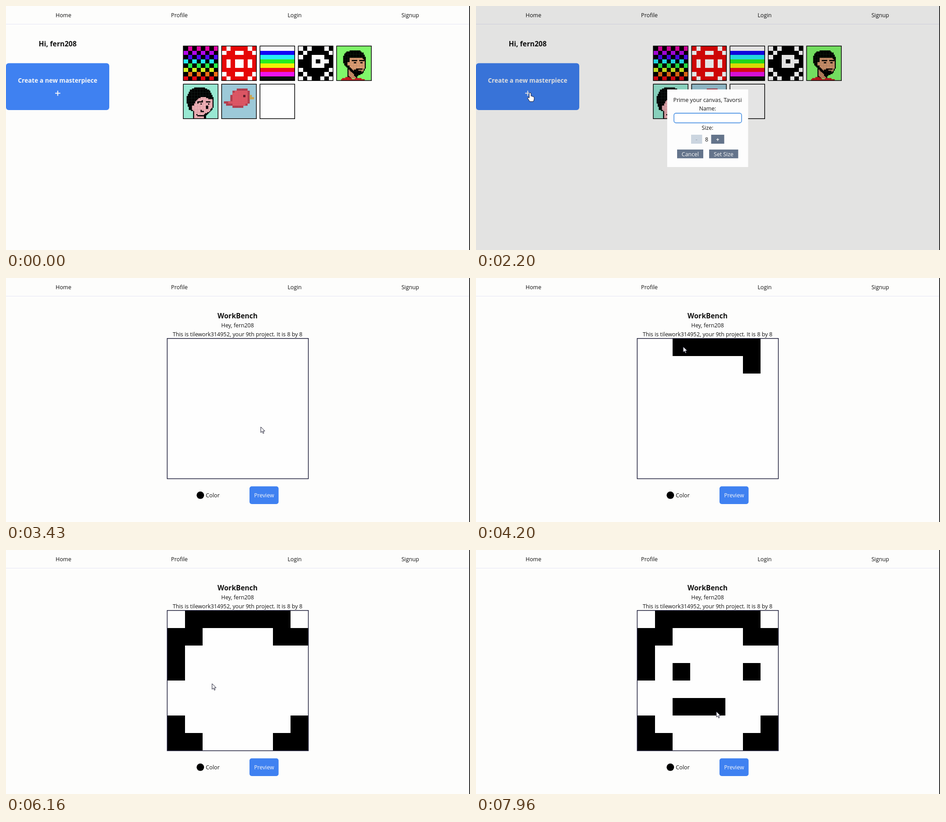
Write an HTML page with a canvas that moves like this. It is 1029x544 px and loops after 8 s.

```html
<!DOCTYPE html>
<html lang="en">
<head>
<meta charset="utf-8">
<title>Pixel workbench</title>
<style>
  html, body { margin: 0; width: 100%; height: 100%; overflow: hidden; background: #fdfdfc; }
  canvas, svg { position: absolute; left: 0; top: 0; display: block; }
  text { font: 12.3px "Open Sans", "Noto Sans", sans-serif; fill: #111; text-anchor: middle; }
  .title { font-size: 15.5px; font-weight: 700; }
  .cta { font-size: 13.6px; font-weight: 700; }
  .light { fill: #f8f8f8; }
  .left { text-anchor: start; }
  .blue { fill: #3f81f1; }
  .slate { fill: #64748b; }
  .cursor path { fill: #fff; stroke: #15152a; stroke-width: 1; stroke-linejoin: round; }
</style>
</head>
<body>
<canvas id="gallery" width="1029" height="270"></canvas>
<svg width="1029" height="544">
  <path d="M0 40.5H1027" stroke="#e4e4f4"/>
  <text x="127.5" y="24.5">Home</text>
  <text x="384.5" y="24.5">Profile</text>
  <text x="640" y="24.5">Login</text>
  <text x="896.5" y="24.5">Signup</text>

  <g id="profile">
    <text class="title" x="114.5" y="90">Hi, fern208</text>
    <rect class="blue" y="127.5" width="229" height="104.5" rx="6"/>
    <text class="cta light" x="114.5" y="171">Create a new masterpiece</text>
    <path d="M109 194.5H120.5M114.7 188.7V200.3" stroke="#f8f8f8" stroke-width="2"/>
  </g>

  <g id="modal">
    <rect width="1027" height="544" opacity=".1"/>
    <rect x="424" y="186" width="179.5" height="173" fill="#fdfdfd"/>
    <text x="513.5" y="214">Prime your canvas, Tavorsi</text>
    <text x="513.5" y="233">Name:</text>
    <rect x="439" y="239" width="150" height="21.5" rx="4.5" fill="#fff" stroke="#5c9ce6" stroke-width="1.8"/>
    <text x="513.5" y="276">Size:</text>
    <rect x="477" y="287" width="24.5" height="20" fill="#cbd5e0"/>
    <text x="489" y="301.5" style="fill:#8b96a6">-</text>
    <text x="511.5" y="302">8</text>
    <rect class="slate" x="521.5" y="287" width="29" height="20"/>
    <text class="light" x="536" y="302" style="font-weight:700">+</text>
    <rect class="slate" x="446" y="320" width="58" height="19.5"/>
    <text class="light" x="475" y="334.5">Cancel</text>
    <rect class="slate" x="517" y="320" width="64.5" height="19.5"/>
    <text class="light" x="549" y="334.5">Set Size</text>
  </g>

  <g id="bench">
    <text class="title" x="513.5" y="90">WorkBench</text>
    <text x="513.5" y="109.5">Hey, fern208</text>
    <text x="513.5" y="129.5">This is tilework314952, your 9th project. It is 8 by 8</text>
    <rect x="357.5" y="134.5" width="313" height="313" fill="#fefefe"/>
    <g id="cells"></g>
    <rect x="357.5" y="134.8" width="313" height="312.7" fill="none" stroke="#1c1c38" stroke-width="1.5"/>
    <circle cx="431" cy="484.3" r="8.3"/>
    <text class="left" x="443" y="489.3">Color</text>
    <rect class="blue" x="540" y="464.5" width="64.5" height="39.5" rx="5"/>
    <text class="light" x="572.3" y="489.3">Preview</text>
  </g>

  <rect x="1027.4" width="1.6" height="544"/>
  <g id="pointer" class="cursor">
    <g id="hand"><path d="M-2 1.5Q0-.9 2 1.5V7.5L7 9Q9 9.6 9 11.5V14Q9 17 7 20H-1Q-3 16-5.4 13Q-6 11-4 10.8L-2 12Z"/></g>
    <g id="arrow"><path d="M0 0V12.5L3 9.8 5 14.6 7 13.7 5 9.2H9Z"/></g>
  </g>
</svg>

<script>
const LOOP = 8000, STEP = 10;
const OPEN = 2040, START = 3430;
const $ = id => document.getElementById(id);
const svg = tag => document.createElementNS('http://www.w3.org/2000/svg', tag);
let rules = '', count = 0;

function animate(el, frames, timing) {
  const name = 'k' + count++;
  const body = frames.map(([ms, css]) => `${ms / LOOP * 100}%{${css}}`).join('');
  rules += `@keyframes ${name}{${body}}`;
  el.style.animation = `${name} ${LOOP}ms ${timing} infinite`;
}

// Visible only inside the given [from, to) spans.
function show(el, ...spans) {
  const frames = spans[0][0] > 0 ? [[0, 'opacity:0']] : [];
  for (const [from, to] of spans) {
    frames.push([from, 'opacity:1'], [to, `opacity:${to < LOOP ? 0 : 1}`]);
  }
  animate(el, frames, 'step-end');
}

show($('gallery'), [0, START]);
show($('profile'), [0, START]);
show($('modal'), [OPEN, START]);
show($('bench'), [START, LOOP]);
show($('hand'), [60, 2450], [3120, START]);
show($('arrow'), [2450, 3120], [START, LOOP]);

// Pointer route: travel eases between stops, draw moves evenly and paints.
const frames = [], painted = new Set();
let now = 0, spot = '120 193';

function paint(x, y, ms) {
  const col = Math.floor((x - 358) / 39), row = Math.floor((y - 135) / 39);
  const key = row * 8 + col;
  if (painted.has(key)) return;
  painted.add(key);
  const cell = svg('rect');
  const box = { x: 358 + col * 39, y: 135 + row * 39, width: 39, height: 39 };
  for (const name in box) cell.setAttribute(name, box[name]);
  $('cells').append(cell);
  show(cell, [ms, LOOP]);
}

function leg(until, route, pen) {
  const path = svg('path');
  path.setAttribute('d', `M${spot}${route}`);
  const length = path.getTotalLength(), from = now;
  for (; now < until; now += STEP) {
    const k = (now - from) / (until - from);
    const p = path.getPointAtLength(length * (pen ? k : k * k * (3 - 2 * k)));
    frames.push([now, `transform:translate(${p.x.toFixed(1)}px,${p.y.toFixed(1)}px)`]);
    if (pen) paint(p.x, p.y, now);
  }
  const end = path.getPointAtLength(length);
  spot = `${end.x} ${end.y}`;
}
const travel = (until, route) => leg(until, route);
const draw = (until, route) => leg(until, route, true);
const rest = until => leg(until, 'h0');

rest(2430);
travel(3230, 'Q420 320 565 332');
rest(START);
travel(3790, 'Q640 230 612 190');
draw(4200, 'L606 154 460 153');
draw(4520, 'L408 155 406 190 376 198 372 275');
travel(4620, 'Q330 330 372 385');
draw(4750, 'L376 425 412 428');
travel(4870, 'Q480 510 600 445');
draw(4970, 'L640 428 650 385');
travel(5000, 'L687 357');
travel(5440, 'Q720 230 655 190');
draw(5470, 'h-4');
travel(6160, 'Q450 225 457 298');
travel(6290, 'L453 275');
draw(6320, 'h4');
travel(6720, 'Q530 250 606 272');
draw(6750, 'h4');
travel(7500, 'Q620 330 452 348');
draw(7960, 'Q460 358 533 360');
rest(LOOP);
frames.push([LOOP, frames.at(-1)[1]]);
animate($('pointer'), frames, 'linear');
document.head.appendChild(document.createElement('style')).textContent = rules;

const ctx = $('gallery').getContext('2d');

function thumb(i, fill) {
  ctx.save();
  ctx.translate(392.5 + i % 5 * 85, 88.5 + Math.floor(i / 5) * 85);
  ctx.fillStyle = '#fefefe';
  ctx.fillRect(0, 0, 78, 78);
  fill();
  ctx.strokeStyle = '#000';
  ctx.lineWidth = 1.5;
  ctx.strokeRect(.75, .75, 77, 77);
  ctx.restore();
}

function grid(color) {
  for (let r = 0; r < 8; r++) for (let c = 0; c < 8; c++) {
    ctx.fillStyle = color(r, c);
    ctx.fillRect(1.5 + Math.round(c * 9.5), 1.5 + Math.round(r * 9.5), 10, 10);
  }
}

const bitmap = (rows, ink) => () => grid((r, c) => rows[r][c] === '#' ? ink : '#fdfdfd');

// Unfolds one quarter into a picture with two mirror axes.
const mirror = list => [...list, ...[...list].reverse()];
const unfold = quarter => mirror(quarter.map(row => mirror([...row])));

// Turns outlines into an n by n pixel picture.
function pixelArt(n, back, shapes) {
  return () => {
    const s = 76 / n;
    ctx.fillStyle = back;
    ctx.fillRect(1, 1, 76, 76);
    const probe = document.createElement('canvas').getContext('2d');
    for (const [color, d] of shapes) {
      const outline = new Path2D(d);
      ctx.fillStyle = color;
      for (let r = 0; r < n; r++) for (let c = 0; c < n; c++) {
        const x = 1 + c * s, y = 1 + r * s;
        if (probe.isPointInPath(outline, x + s / 2, y + s / 2)) ctx.fillRect(x, y, s + .3, s + .3);
      }
    }
  };
}

const checks = ['#e203a6', '#b306ea', '#4b08f5', '#22eaf6', '#24ec46', '#d3f021', '#ee6c12', '#e60613'];
const bands = ['#fdfcfd', '#1206f5', '#27eef6', '#25ee20', '#f2f205', '#f00a1c', '#ee14ee', '#0c0f0c'];

[
  () => grid((r, c) => (r + c) % 2 ? checks[r] : '#000'),
  bitmap(unfold(['#.##', '.##.', '####', '#.#.']), '#e60606'),
  () => grid(r => bands[r]),
  bitmap(['.#.###.#', '#.#####.', '.##...##', '###.#..#', '###...##', '.######.', '#.####.#', '.#.##.#.'], '#000'),
  pixelArt(32, '#80f76a', [
    ['#000', 'M16 38V22L22 14 34 10H50L60 16 65 26V50L58 62 46 68V72H24V50L18 44Z'],
    ['#dc9c74', 'M30 27H58L63 34V50L56 60H40L29 52V44H25V36H30Z'],
    ['#c98a64', 'M27 52L38 64 44 72H34L27 66Z'],
    ['#c5121f', 'M7 78L12 74 26 69 36 75 46 72 60 74 65 78Z'],
    ['#000', 'M34 32H46V35H34ZM51 32H62V35H51ZM39 37H43V39H39ZM54 37H58V39H54ZM50 38H52V45H50ZM29 48L38 55 46 50H57V53H48V55H57L54 63H42L30 56Z']
  ]),
  pixelArt(32, '#98e8d2', [
    ['#000', 'M9 44V28L16 14 30 7H46L60 16 67 30V53L60 63 50 71V78H22V62L14 57Z'],
    ['#f0b0b6', 'M25 45L30 37 38 31 46 28 57 34 65 35V52L58 61 47 68V78H25V61L19 56V48H25Z'],
    ['#000', 'M33 40L44 37V40L33 43ZM52 38H61V41H52ZM39 43H42V47H39ZM56 43H59V47H56ZM52 48H55V55H50V53H52ZM38 57H42V60H47V63H38ZM27 66L36 71H45V73H34Z']
  ]),
  pixelArt(16, '#9cc9d8', [
    ['#b03c4c', 'M6 38L20 40 22 24 28 16 36 10H55L64 20V38L56 46 48 52H26L20 48H10Z'],
    ['#dc5664', 'M14 40H22L26 22 36 14H55L60 22V38L50 47H26L18 44Z'],
    ['#c9a350', 'M63 24H68V29H72V33H63Z'],
    ['#5c1c28', 'M48 25H54V30H48Z']
  ]),
  () => {}
].forEach((fill, i) => thumb(i, fill));
</script>
</body>
</html>
```
